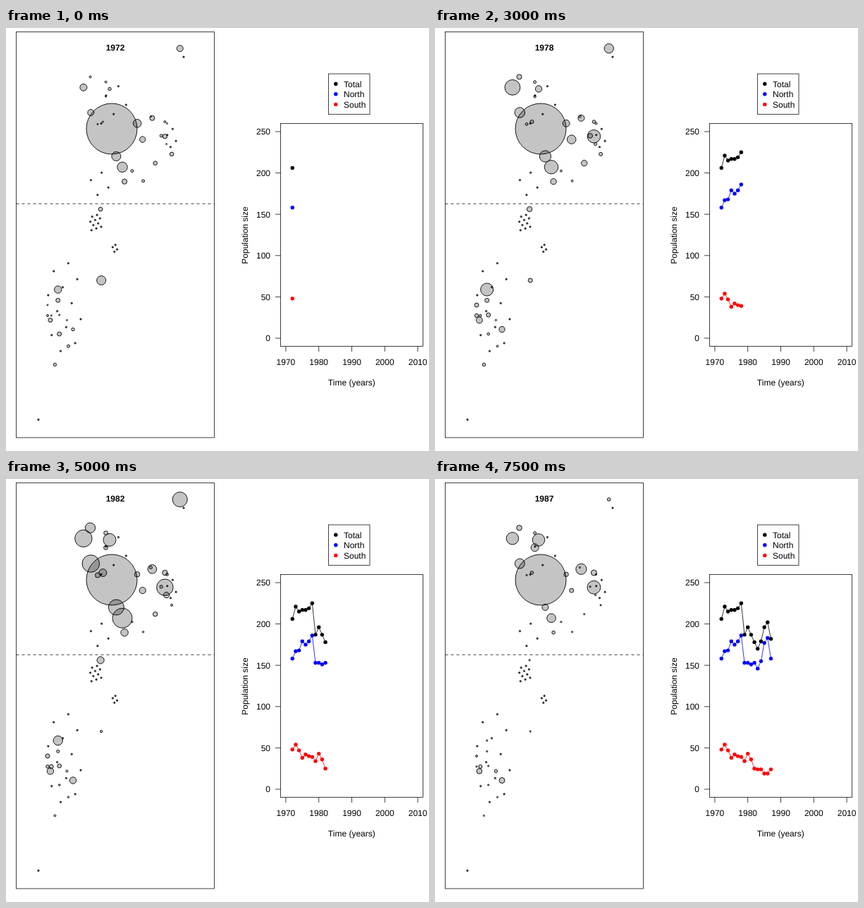
An HTML page that plays this animation: 600 px wide and 600 px high, repeating every 8000 ms.

```html
<!DOCTYPE html>
<html lang="en">
<head>
<meta charset="utf-8">
<title>Population by year</title>
<style>
  html, body { margin: 0; width: 100%; height: 100%; overflow: hidden; background: #fff; }
  svg { display: block; width: 100vw; height: 100vh; }
  text { font: 12px "Liberation Sans", Arial, sans-serif; fill: #000; text-rendering: geometricPrecision; }
  .frame { fill: none; stroke: #000; stroke-width: .75; }
  .site { fill: #000; fill-opacity: .23; stroke: #000; stroke-width: .9; }
  .dot { fill: #000; fill-opacity: .5; stroke: #000; stroke-width: 1; }
</style>
</head>
<body>
<svg id="stage" viewBox="0 0 600 600"></svg>
<script>
const FIRST = 1972, YEARS = 16, LAST = FIRST + YEARS - 1, STEP = 500;
const DOT = 1.1, GOLDEN = (Math.sqrt(5) - 1) / 2;
const stage = document.getElementById('stage');

function add(tag, attrs, text) {
  const node = document.createElementNS('http://www.w3.org/2000/svg', tag);
  for (const name in attrs) node.setAttribute(name, attrs[name]);
  if (text !== undefined) node.textContent = text;
  return stage.appendChild(node);
}
const line = (x1, y1, x2, y2, extra) => add('line', { x1, y1, x2, y2, class: 'frame', ...extra });
const box = (x, y, width, height) => add('rect', { x, y, width, height, class: 'frame' });
const label = (x, y, text, anchor = 'middle', extra) =>
  add('text', { x, y, 'text-anchor': anchor, ...extra }, text);
const dot = (cx, cy) => add('circle', { cx, cy, r: DOT, class: 'dot' });

// A colony swells from its first size to a peak, then shrinks to its last size
const sites = [];
function site(cx, cy, start, peakYear = FIRST, peak = start, end = DOT) {
  const node = add('circle', { cx, cy, class: 'site' });
  sites.push({ node, start, peakYear, peak, end });
}
function radiusAt({ start, peakYear, peak, end }, year) {
  const rising = year < peakYear;
  const side = rising ? start : end;
  const span = rising ? peakYear - FIRST : LAST - peakYear;
  const nearness = span ? 1 - Math.abs(year - peakYear) / span : 1;
  return side + (peak - side) * nearness ** 2;
}

// Empty sites, spread evenly through a patch of land
function scatter(left, top, width, height, count) {
  for (let i = 1; i <= count; i++)
    dot(left + width * (i * GOLDEN % 1), top + height * (i - .5) / count);
}

box(14.5, 5.5, 281, 575.5);
line(14.5, 249.3, 295.5, 249.3, { 'stroke-dasharray': '4 4' });
const title = label(155, 32, FIRST, 'middle', { style: 'font-weight:bold' });

// North
site(150, 143, 36, LAST);
site(246.7, 29, 4.5, 1984, 13.2, 2.3);
site(119.5, 69.3, 1.5, 1982, 7.2, 3.8);
site(109.9, 84.3, 5, 1980, 15.5, 8.7);
site(141.6, 76.6, 1.5, 1984, 3.5, 2);
site(147, 86.4, 2.2, 1984, 12, 8.7);
site(141.6, 97.3, 1, 1987, 5.5);
site(120.3, 120, 4.5, 1984, 15.7, 7);
site(137.4, 133, 1, 1982, 5.5, 2.3);
site(130, 136.4, 1, 1984, 4.7);
site(186.1, 135.3, 5.8, 1980, 4.3, 3.2);
site(207.4, 127.8, 3.5, 1985, 8.3, 7.6);
site(205.4, 125.5, 1, 1981, 2.5);
site(225.4, 133, 1.5, 1984, 4.7, 4);
site(228.5, 135.4, 1, 1981, 2.3);
site(225.4, 153.7, 3.2, 1980, 14, 9.4);
site(220.2, 152.8, 2, 1979, 3.9);
site(227.6, 164.6, 1, 1983, 4.8);
site(235.1, 178.9, 2.8, 1975, 3.6);
site(193.7, 158.1, 4.2, 1979, 7, 3);
site(211.7, 191.7, 2.8, 1980, 5.3);
site(156.4, 182, 6.5, 1984, 13, 4.5);
site(165, 197.3, 7.2, 1984, 17, 6.3);
site(168.1, 217.8, 3.6, 1984, 6, 2.3);
site(178.9, 202.7, 2);
site(194.6, 216.9, 2);
dot(252, 41);
scatter(131, 76, 46, 66, 5);
scatter(224, 139, 20, 34, 4);
scatter(111, 200, 40, 42, 4);

// South
site(134.1, 257, 2.9, 1984, 6);
site(135.2, 358, 6.5);
site(73.7, 371, 5.2, 1980, 12);
site(73.7, 386.3, 3, 1980);
site(59, 393, 1, 1980, 4.5, 1.5);
site(59, 407.9, 1.5, 1980, 3.5);
site(64.3, 407.9, 1, 1984, 3.7, 2.5);
site(62.9, 414.4, 3, 1980, 5.6, 3.8);
site(75.7, 407, 1, 1980, 4.5);
site(75.7, 434, 3);
site(95, 427.5, 2.2, 1980, 5.5, 4);
site(88.5, 451.3, 2);
site(86.4, 414.4, 1, 1987, 2.2);
site(69.4, 477.5, 2.2, 1974, 3.7);
dot(46, 555.5);
scatter(118, 264, 18, 24, 10);
scatter(149, 306, 10, 13, 4);
scatter(55, 328, 54, 136, 12);

// Chart
const xOf = year => 396.9 + (year - 1970) * 4.68;
const yOf = count => 440 - count * 1.172;

box(389.5, 135.5, 202, 316);
for (let year = 1970; year <= 2010; year += 10) {
  line(xOf(year), 451.5, xOf(year), 459);
  label(xOf(year), 478, year);
}
for (let count = 0; count <= 250; count += 50) {
  line(382, yOf(count), 389.5, yOf(count));
  label(375, yOf(count) + 4.4, count, 'end');
}
label(490.3, 507, 'Time (years)');
label(0, 0, 'Population size', 'middle', { transform: 'translate(343 294) rotate(-90)' });

const north = [158, 167, 168, 179, 175, 179, 186, 153, 153, 151, 153, 146, 155, 177, 183, 158];
const south = [48, 54, 47, 38, 42, 40, 39, 34, 43, 36, 25, 24, 24, 19, 19, 24];
const total = north.map((n, i) => n + south[i]);

box(457.5, 65, 58.5, 57.3);
const series = [['Total', '#000', total], ['North', '#00f', north], ['South', '#f00', south]]
  .map(([name, color, counts], row) => {
    const y = 79.2 + row * 14.6;
    add('circle', { cx: 467.8, cy: y, r: 2.7, fill: color });
    label(479, y + 4.4, name, 'start');
    const points = counts.map((n, i) => [xOf(FIRST + i), yOf(n)]);
    return {
      points,
      path: add('polyline', { fill: 'none', stroke: color, 'stroke-width': .8 }),
      marks: points.map(([cx, cy]) => add('circle', { cx, cy, r: 2.7, fill: color }))
    };
  });

function draw(index) {
  title.textContent = FIRST + index;
  for (const s of sites) s.node.setAttribute('r', radiusAt(s, FIRST + index));
  for (const { points, path, marks } of series) {
    path.setAttribute('points', points.slice(0, index + 1).join(' '));
    marks.forEach((mark, i) => mark.setAttribute('visibility', i <= index ? 'visible' : 'hidden'));
  }
}

const start = performance.now();
let shown = -1;
function tick(now) {
  const index = Math.floor(Math.max(0, now - start) / STEP) % YEARS;
  if (index !== shown) draw(shown = index);
  requestAnimationFrame(tick);
}
tick(start);
</script>
</body>
</html>
```
